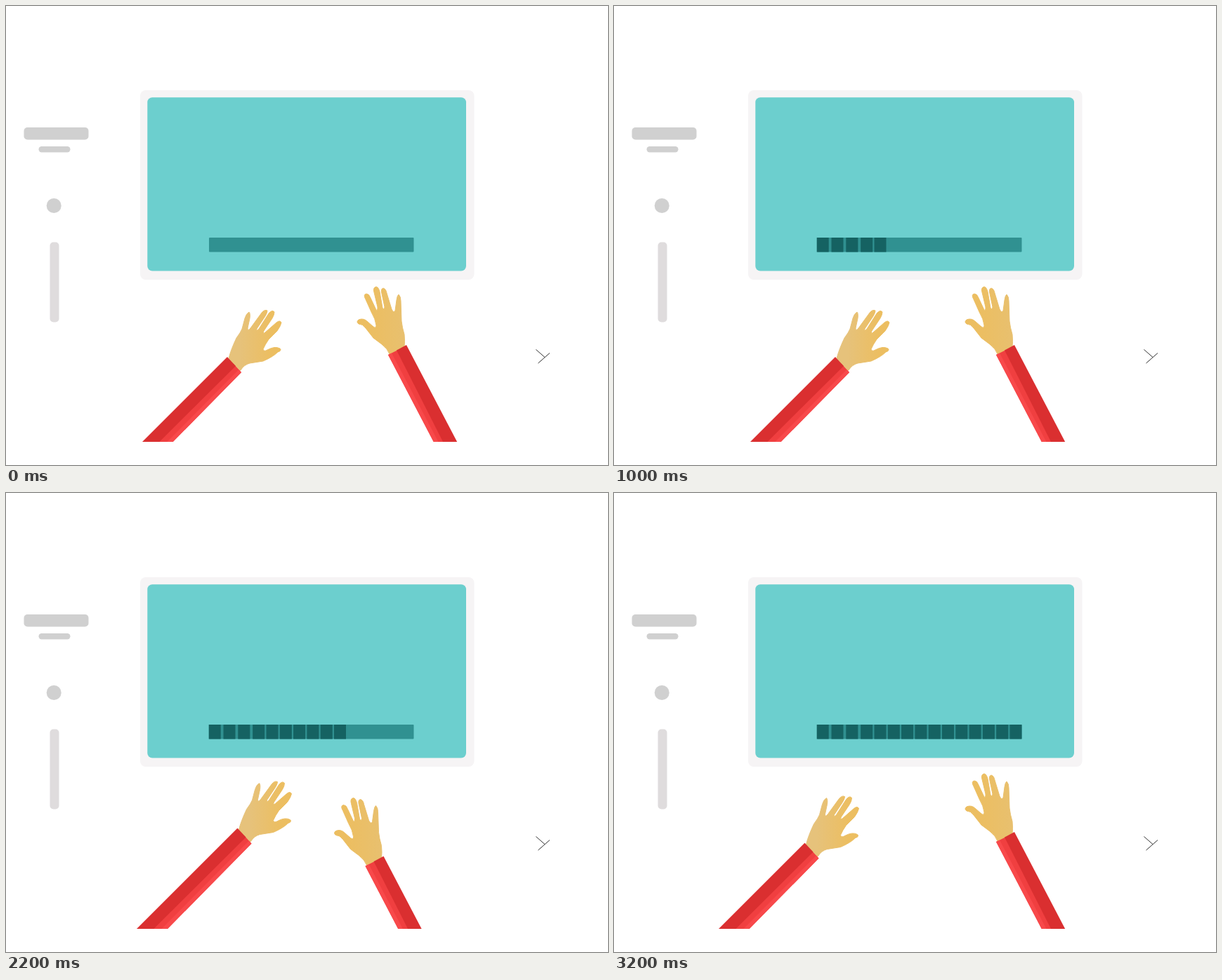
Recreate the animation shown at these times as an HTML page. Size 857 px wide and 654 px high, loop 3400 ms.

```html
<!DOCTYPE html>
<html lang="en">
<head>
<meta charset="utf-8">
<title>Typing hands</title>
<style>
  html, body { margin: 0; width: 100%; height: 100%; overflow: hidden; background: #fff; }
  svg { display: block; width: 100%; height: 100%; }
  .hand { stroke-linejoin: round; stroke-width: 1; }
</style>
</head>
<body>
<svg viewBox="0 0 857 654">
  <defs>
    <clipPath id="desk"><rect width="857" height="621"/></clipPath>
    <linearGradient id="skinL"><stop offset=".2" stop-color="#e6c27b"/><stop offset=".8" stop-color="#ecbe61"/></linearGradient>
    <linearGradient id="skinR"><stop offset=".3" stop-color="#ecbe61"/><stop offset="1" stop-color="#e8c06f"/></linearGradient>
  </defs>

  <g fill="#d0d0d0">
    <rect x="25.5" y="173" width="92" height="17.5" rx="5"/>
    <rect x="46.5" y="200" width="45" height="8.5" rx="4.2"/>
    <circle cx="68.2" cy="284.5" r="10.5"/>
    <rect x="62.5" y="336.5" width="13" height="114" rx="5" fill="#dfdcdd"/>
  </g>

  <rect x="191" y="120" width="475.500" height="270" rx="8" fill="#f6f4f5"/>
  <rect x="201.300" y="130.300" width="453.700" height="247.200" rx="7" fill="#6ccfce"/>
  <rect x="289" y="330" width="291.500" height="20.500" rx="1" fill="#309191"/>
  <g id="blocks" fill="#156262"></g>

  <path d="M754.500 489.500L767 500.500M774 494.500L757.500 509" stroke="#333" fill="none"/>

  <g clip-path="url(#desk)">
    <g id="left">
      <path class="hand" fill="url(#skinL)" stroke="url(#skinL)" d="M317 502Q320 490 328 473Q334 465 336 460L340 445Q342 438 346 436Q348 438 347 445L344 459
        Q344 464 348 459L364 437Q368 432 372 434Q372 437 369 442L357 460Q356 464 360 460L374 438Q379 432 382 436Q382 440 379 445L367 463
        Q365 468 369 465L385 451Q390 447 392 451Q391 456 386 463L374 475Q369 482 366 489Q367 493 372 490Q383 484 390 488Q393 491 387 493
        Q380 500 366 506L347 509Q339 511 334 519L328 520Z"/>
      <path fill="#f03f40" d="M324 510L335 522L160 700H139Z"/>
      <path fill="#f8494b" d="M331.500 518L335 522L160 700H151Z"/>
      <path fill="#da2f30" d="M315 500L327 513L139 700H115Z"/>
    </g>
    <g id="right">
      <path class="hand" fill="url(#skinR)" stroke="url(#skinR)" d="M546 496Q543 488 535 482L523 473L512 459Q508 453 502 453Q498 450 502 447Q509 444 515 450L523 457
        Q527 460 527 455Q526 446 520 436L512 418Q508 411 513 410Q517 410 519 416L527 433Q529 435 529 429L524 408Q522 401 527 400
        Q530 400 532 407L536 430Q538 434 539 429L535 410Q533 403 537 402Q541 403 542 409L549 432Q552 438 554 434L556 419
        Q557 412 559 411Q562 414 562 420L563 449Q564 458 567 468Q568 478 567 486L558 497Z"/>
      <path fill="#f03f40" d="M544 497L558 490L673 700H650Z"/>
      <path fill="#f8494b" d="M544 497L549 494.500L657 700H650Z"/>
      <path fill="#da2f30" d="M556 490.500L570 483L683.500 700H662Z"/>
    </g>
  </g>
</svg>
<script>
const STEP = 200, STEPS = 17, BLOCKS = 15;
const $ = id => document.getElementById(id);

// Offsets from the resting pose, keyed by step.
const leftTaps = { 8: [-27, -1], 11: [14.5, -22.5], 12: [20, 0], 16: [-43.5, -1.5] };
const rightTaps = {
  1: [-20, 17], 4: [54, 0], 8: [0, 8], 9: [-26.5, 34],
  11: [-32.5, 34.5], 12: [-29.5, 34], 15: [-12, 14]
};

const blocks = Array.from({ length: BLOCKS }, (_, i) => {
  const rect = document.createElementNS("http://www.w3.org/2000/svg", "rect");
  const x = i < 3 ? 288.7 + 20.8 * i : 351.2 + 19.3 * (i - 3);
  const attrs = { x, y: 330, width: 17, height: 20.5 };
  for (const name in attrs) rect.setAttribute(name, attrs[name]);
  return $("blocks").appendChild(rect);
});

// The bar stalls at steps 8 and 16 and gains two blocks at step 14.
const filled = step => Math.min(BLOCKS, step - (step >= 8) + (step >= 14));

const place = (id, taps, step) =>
  $(id).setAttribute("transform", `translate(${taps[step] || [0, 0]})`);

let start;
function draw(now) {
  start ??= now;
  const step = Math.floor((now - start) / STEP) % STEPS;
  const count = filled(step);
  blocks.forEach((b, i) => b.setAttribute("visibility", i < count ? "visible" : "hidden"));
  place("left", leftTaps, step);
  place("right", rightTaps, step);
  requestAnimationFrame(draw);
}
requestAnimationFrame(draw);
</script>
</body>
</html>
```
